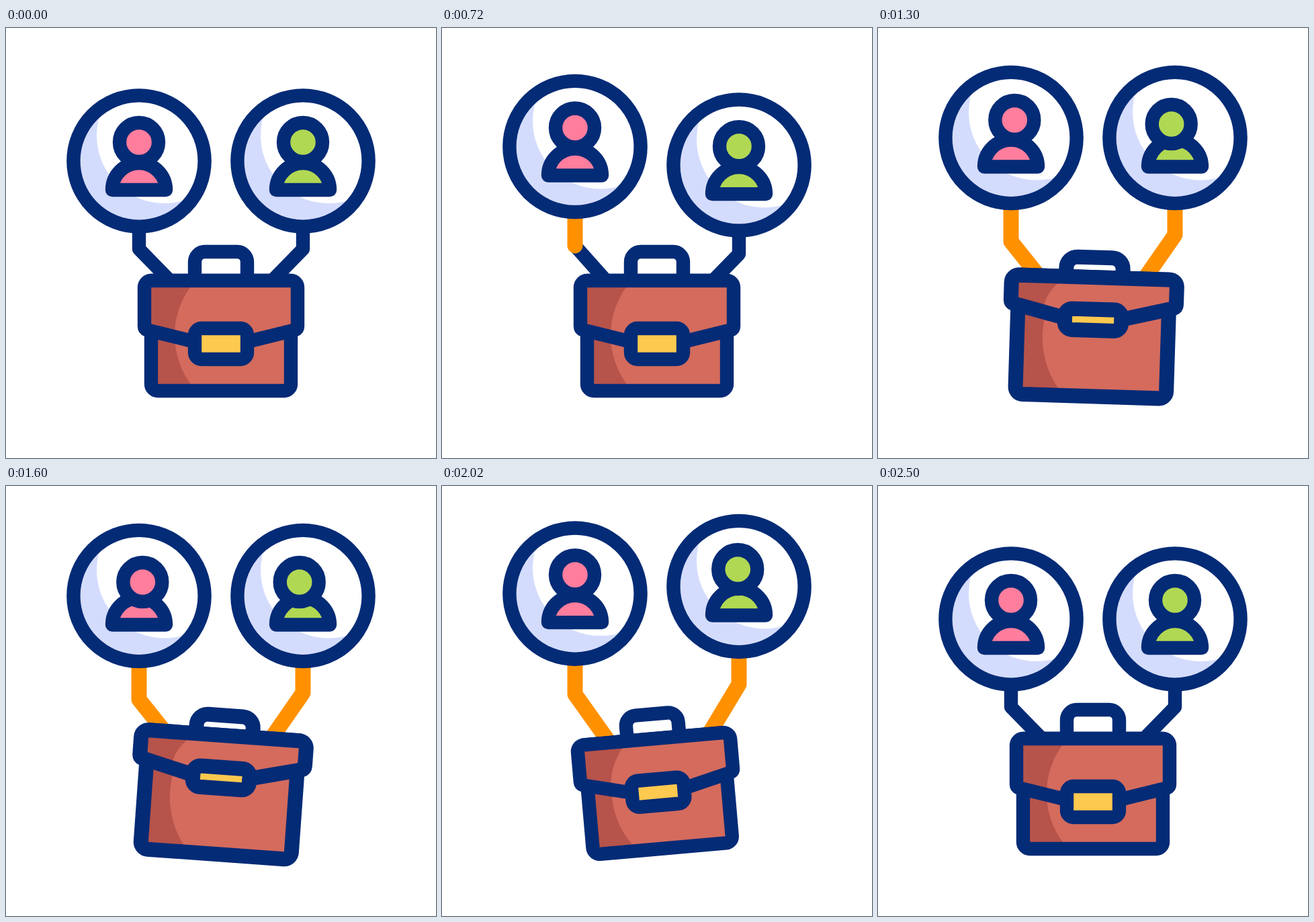
An HTML page for the animation above (3.28 s loop, 640x640 px).

```html
<!DOCTYPE html>
<html lang="en">
<head>
<meta charset="utf-8">
<title>Briefcase team</title>
<style>
  html, body { margin: 0; width: 100%; height: 100%; overflow: hidden; background: #fff; }
  svg { display: block; width: 100vw; height: 100vh; }
  .ink { stroke: #042b76; stroke-width: 20.4; stroke-linejoin: round; }
  .glow { stroke: #ff9100; stroke-width: 23; stroke-linecap: round; stroke-linejoin: round; }
</style>
</head>
<body>
<svg viewBox="0 0 640 640" fill="none">
  <defs>
    <clipPath id="disc"><circle r="92"/></clipPath>
    <path id="case" d="M216 376H424V530A10 10 0 0 1 414 540H226A10 10 0 0 1 216 530Z"/>
  </defs>
  <g id="wires"></g>
  <g id="bag">
    <path id="handle" class="ink"/>
    <use href="#case" fill="#d46b5d"/>
    <path d="M216 376H282A122.6 122.6 0 0 0 283 540H216Z" fill="#b6534a"/>
    <use href="#case" class="ink"/>
    <path id="flap" fill="#d46b5d"/>
    <path id="flapShade" fill="#b6534a"/>
    <path id="flapLine" class="ink"/>
    <rect id="clasp" class="ink" x="281" width="78" rx="10" fill="#fdc94f"/>
  </g>
  <g id="people"></g>
</svg>
<script>
const LOOP = 3280;
const $ = id => document.getElementById(id);

// Eased 0 to 1, beginning at start.
function ramp(t, start, length) {
  const p = Math.min(1, Math.max(0, (t - start) / length));
  return p * p * (3 - 2 * p);
}

// Eased 0 to 1 at on, back to 0 at off.
const pulse = (t, on, off, rise = 280, fall = rise) =>
  ramp(t, on, rise) - ramp(t, off, fall);

function set(el, attrs) {
  for (const name in attrs) el.setAttribute(name, attrs[name]);
  return el;
}

function add(parent, tag, attrs) {
  const el = document.createElementNS('http://www.w3.org/2000/svg', tag);
  return parent.appendChild(set(el, attrs));
}

function makePerson(cfg) {
  const wire = add($('wires'), 'path', { class: 'ink' });
  const glow = add($('wires'), 'path', { class: 'glow', pathLength: 1 });
  const root = add($('people'), 'g', {});
  add(root, 'circle', { r: 97.5, fill: '#d4dcfd' });
  add(root, 'circle', { cx: 38, cy: -38, r: 101, fill: '#fff', 'clip-path': 'url(#disc)' });
  add(root, 'circle', { r: 97.6, class: 'ink' });
  add(root, 'path', { d: 'M-40 43A40 40 0 0 1 40 43Z', fill: cfg.color, class: 'ink' });
  const head = add(root, 'circle', { cy: -28, r: 29, fill: cfg.color, class: 'ink' });
  return { ...cfg, wire, glow, root, head };
}

const people = [
  makePerson({ x: 198, side: 1, color: '#ff7d9d', up: 260, down: 1736, fall: 350,
    pull: 0.5, turn: 846, nod: 1220, rest: 1628 }),
  makePerson({ x: 442, side: -1, color: '#b1d853', up: 430, down: 1808, fall: 450,
    pull: 0.7, turn: 1010, nod: 1010, rest: 1850 })
];

function drawPerson(p, t) {
  // A short wind-up against the direction of travel, then the travel itself.
  const wind = 15 * pulse(t, p.up, p.down, 175);
  const travel = -49.5 * pulse(t, p.up + 175, p.down + 175, 430, p.fall);
  const cy = 198 + wind + travel;
  const bend = wind * 0.9 + travel * p.pull;

  const elbow = 329 + bend;
  const run = 40 - bend * (bend > 0 ? 1 : 0.15);
  const d = `M${p.x} ${cy + 90}V${elbow}l${p.side * run * 1.25} ${(41 - bend) * 1.25}`;
  set(p.wire, { d });

  const from = ramp(t, p.down + p.fall * 0.73, 300);
  const size = ramp(t, p.up + 330, 290) - from;
  set(p.glow, {
    d,
    display: size > 0.001 ? 'inline' : 'none',
    'stroke-dasharray': `${size} 3`,
    'stroke-dashoffset': -from
  });

  const headX = p.side * 5.3 * pulse(t, p.turn, p.rest);
  const headY = 7.5 * pulse(t, p.nod, p.rest);
  set(p.root, { transform: `translate(${p.x} ${cy})` });
  set(p.head, { transform: `translate(${headX} ${headY})` });
}

function drawBag(t) {
  const sway = -5 * Math.cos(Math.PI * (t - 980) / 520) * pulse(t, 760, 2020, 220, 150);
  const size = 1 + 0.08 * pulse(t, 820, 1620, 330, 400);
  const open = pulse(t, 910, 1865, 290, 275);
  set($('bag'), {
    transform: `translate(320 437) rotate(${sway}) scale(${size}) translate(-320 -437)`
  });

  const top = 333 + 15.5 * open;
  set($('handle'), {
    d: `M281 376V${top + 15}a15 15 0 0 1 15 -15H344a15 15 0 0 1 15 15V376`
  });

  const y = v => v - 34 * open;
  const lid = `M281 ${y(467)}L210 ${y(449.5)}Q206 ${y(448)} 206 ${y(444)}V386` +
    `a10 10 0 0 1 10 -10H424a10 10 0 0 1 10 10V${y(444)}` +
    `Q434 ${y(448)} 430 ${y(449.5)}L359 ${y(467)}`;
  set($('flap'), { d: lid + 'Z' });
  set($('flapLine'), { d: lid });
  set($('flapShade'), {
    d: `M210 376H282A122.6 ${122.6 * (1 - 0.4 * open)} 0 0 0 251 ${y(460)}L210 ${y(449.5)}Z`
  });
  set($('clasp'), { y: 447 - 27 * open, height: 46 - 17 * open });
}

function frame() {
  const t = performance.now() % LOOP;
  people.forEach(p => drawPerson(p, t));
  drawBag(t);
  requestAnimationFrame(frame);
}
frame();
</script>
</body>
</html>
```
